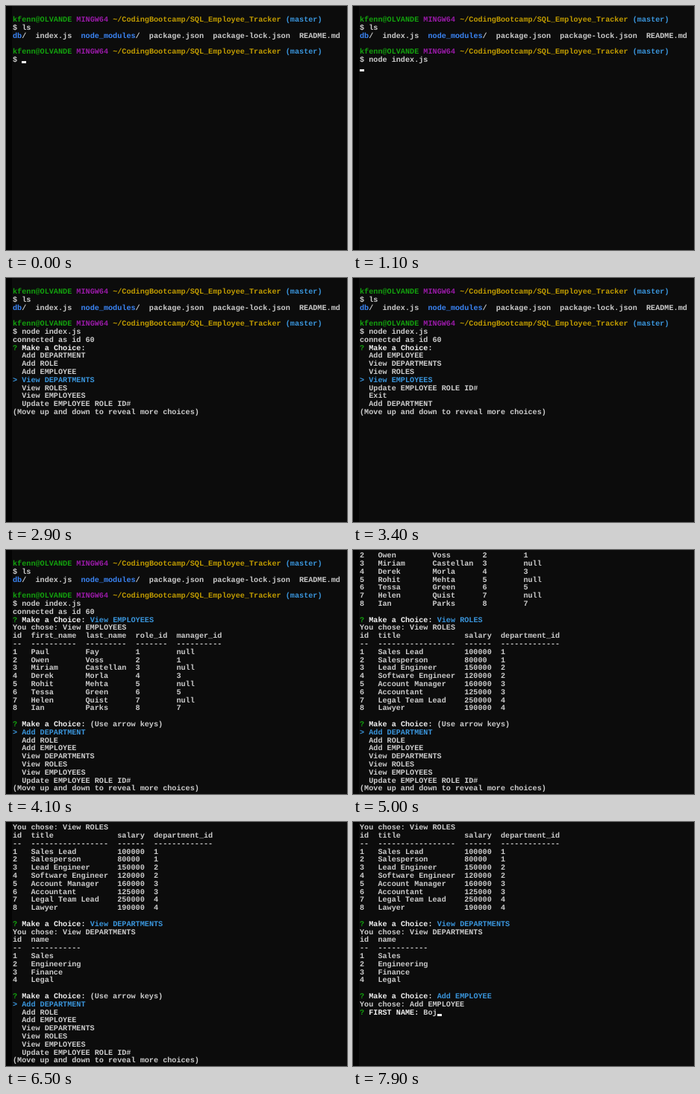
Recreate the animation shown at these times as an HTML page. Size 457x328 px, loop 8000 ms.

```html
<!DOCTYPE html>
<html lang="en">
<head>
<meta charset="utf-8">
<title>Employee tracker terminal</title>
<style>
  html, body { margin: 0; width: 100%; height: 100%; overflow: hidden; background: #0c0c0c; }
  body { position: relative; }
  body::before { content: ""; position: absolute; left: 0; top: 0; width: 8px; height: 100%; background: #040404; }
  pre {
    position: absolute; left: 9px; top: 4.2px; margin: 0;
    font: bold 10.16px/10.8px "Courier New", "Liberation Mono", monospace;
    text-rendering: geometricPrecision; font-variant-ligatures: none;
    color: #ccc;
  }
  .green { color: #13a10e; }
  .purple { color: #9a1aa8; }
  .gold { color: #c19c00; }
  .cyan { color: #3a96dd; }
  .blue { color: #3b85f5; }
  .white { color: #f2f2f2; }
  .cursor { display: inline-block; width: 6px; height: 3px; vertical-align: -2px; background: #f2f2f2; }
</style>
</head>
<body>
<pre id="screen"></pre>
<script>
const LOOP = 8000, STEP = 100, ROWS = 30, PAGE = 7;
const COMMAND = 'node index.js', NAME = 'Boj';
const CHOICES = ['Add DEPARTMENT', 'Add ROLE', 'Add EMPLOYEE', 'View DEPARTMENTS',
  'View ROLES', 'View EMPLOYEES', 'Update EMPLOYEE ROLE ID#', 'Exit'];

const paint = (color, text) => `<span class="${color}">${text}</span>`;
const CURSOR = paint('cursor', '');
const question = text => paint('green', '?') + ' ' + paint('white', text) + ' ';

// Lays out "a,b|c,d" as numbered rows under dashed headings.
function table(heads, data) {
  const rows = data.split('|').map((row, i) => [String(i + 1), ...row.split(',')]);
  const names = ['id', ...heads.split(',')];
  const widths = names.map((name, c) => Math.max(name.length, ...rows.map(r => r[c].length)));
  const line = cells => cells.map((cell, c) => cell.padEnd(widths[c])).join('  ');
  return [line(names), line(widths.map(w => '-'.repeat(w))), ...rows.map(line), ''];
}

const employees = table('first_name,last_name,role_id,manager_id',
  'Paul,Fay,1,null|Owen,Voss,2,1|Miriam,Castellan,3,null|Derek,Morla,4,3|' +
  'Rohit,Mehta,5,null|Tessa,Green,6,5|Helen,Quist,7,null|Ian,Parks,8,7');
const roles = table('title,salary,department_id',
  'Sales Lead,100000,1|Salesperson,80000,1|Lead Engineer,150000,2|Software Engineer,120000,2|' +
  'Account Manager,160000,3|Accountant,125000,3|Legal Team Lead,250000,4|Lawyer,190000,4');
const departments = table('name', 'Sales|Engineering|Finance|Legal');

// Each round: times of the down key, time of Enter, printed result.
const rounds = [
  { downs: [2300, 2500, 2800, 3100, 3300], enter: 3600, output: employees },
  { downs: [4300, 4400, 4500, 4600], enter: 4800, output: roles },
  { downs: [5400, 5600, 5800], enter: 6100, output: departments },
  { downs: [6700, 6900], enter: 7100, output: [] }
];

const prompt = [paint('green', 'kfenn@OLVANDE'), paint('purple', 'MINGW64'),
  paint('gold', '~/CodingBootcamp/SQL_Employee_Tracker'), paint('cyan', '(master)')].join(' ');
const listing = [paint('blue', 'db') + '/', 'index.js', paint('blue', 'node_modules') + '/',
  'package.json', 'package-lock.json', 'README.md'].join('  ');

function menu(selected) {
  const first = Math.max(0, selected - 3);
  const items = Array.from({ length: PAGE }, (_, i) => {
    const n = first + i, label = CHOICES[n % CHOICES.length];
    return n === selected ? paint('cyan', '> ' + label) : '  ' + label;
  });
  return [question('Make a Choice:') + (selected ? '' : '(Use arrow keys)'),
    ...items, '(Move up and down to reveal more choices)'];
}

function typed(text, t, start, pace) {
  return text.slice(0, Math.max(0, Math.floor((t - start) / pace)));
}

function screenAt(t) {
  const lines = ['', prompt, '$ ls', listing, '', prompt];
  lines.push('$ ' + typed(COMMAND, t, 0, 70) + (t < 1100 ? CURSOR : ''));
  if (t < 1100) return lines;
  if (t < 1700) return [...lines, CURSOR];
  lines.push('connected as id 60');
  if (t < 1900) return [...lines, CURSOR];

  let top = 0;
  for (const { downs, enter, output } of rounds) {
    top = Math.max(top, lines.length + PAGE + 2 - ROWS);
    if (t < enter) {
      lines.push(...menu(downs.filter(d => d <= t).length));
      return lines.slice(top);
    }
    const choice = CHOICES[downs.length];
    lines.push(question('Make a Choice:') + paint('cyan', choice), 'You chose: ' + choice, ...output);
  }
  lines.push(question('FIRST NAME:') + typed(NAME, t, 7350, 150) + CURSOR);
  return lines.slice(top);
}

const screen = document.getElementById('screen');
let shown = '';
function draw() {
  const t = Math.floor(performance.now() % LOOP / STEP) * STEP;
  const html = screenAt(t).map(line => line || ' ').join('\n');
  if (html !== shown) screen.innerHTML = shown = html;
  requestAnimationFrame(draw);
}
draw();
</script>
</body>
</html>
```
